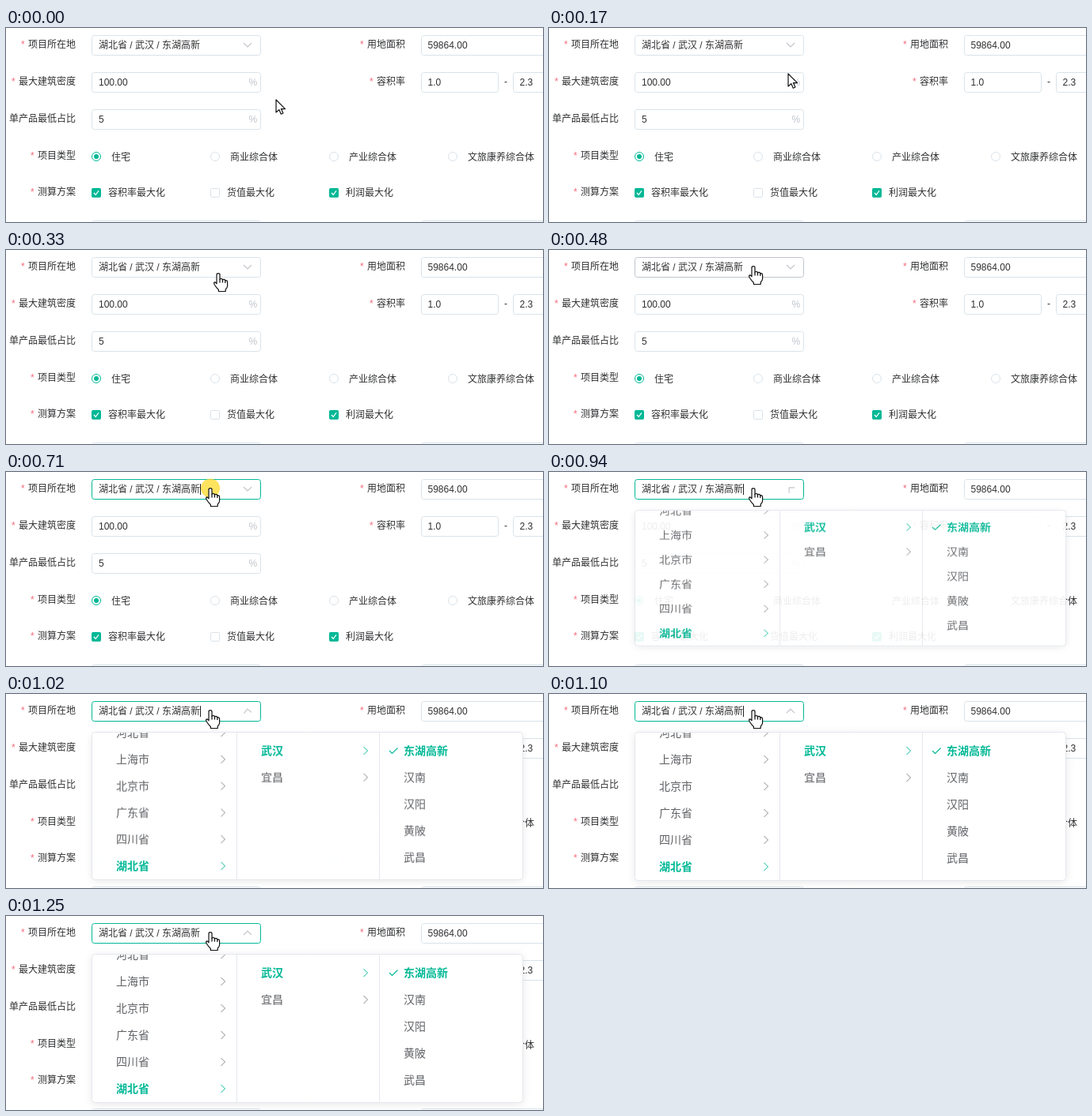
Recreate the animation shown at these times as an HTML page with a canvas. Size 678 px wide and 246 px high, loop 1.55 s.

```html
<!DOCTYPE html>
<html lang="zh-CN">
<head>
<meta charset="utf-8">
<style>
html, body { margin: 0; width: 100%; height: 100%; overflow: hidden; background: #fff; }
canvas { display: block; }
</style>
</head>
<body>
<canvas id="stage" width="678" height="246"></canvas>
<script>
const LOOP = 1550;
const STEPS = [0, 70, 140, 200, 270, 330, 400, 480, 710, 790, 870, 940, 1020, 1100, 1170, 1250];
const FONT = '"Liberation Sans", "Noto Sans CJK SC", "Noto Sans CJK", sans-serif';
const GREEN = '#00b896', LINE = '#d9e3ea', INK = '#303133', GREY = '#606266', PALE = '#c0c4cc', STAR = '#f56c7c';
const PANEL_TOP = 48;

const stage = document.getElementById('stage');
const screen = stage.getContext('2d');

function text(c, str, x, y, color = INK, size = 12, weight = 400) {
  c.font = `${weight} ${size}px ${FONT}`;
  c.fillStyle = color;
  c.fillText(str, x, y);
}

function box(c, x, y, w, h, r, stroke, fill) {
  c.beginPath();
  c.roundRect(x + .5, y + .5, w - 1, h - 1, r);
  if (fill) { c.fillStyle = fill; c.fill(); }
  if (stroke) { c.strokeStyle = stroke; c.lineWidth = 1; c.stroke(); }
}

function line(c, points, color, width = 1) {
  c.beginPath();
  points.forEach(([x, y]) => c.lineTo(x, y));
  c.strokeStyle = color;
  c.lineWidth = width;
  c.stroke();
}

function disc(c, x, y, r, fill, stroke) {
  c.beginPath();
  c.arc(x, y, r, 0, Math.PI * 2);
  if (fill) { c.fillStyle = fill; c.fill(); }
  if (stroke) { c.strokeStyle = stroke; c.lineWidth = 1; c.stroke(); }
}

// CSS-style cubic-bezier timing
function bezier(x1, y1, x2, y2) {
  const at = (a, b, u) => 3 * a * u * (1 - u) ** 2 + 3 * b * u * u * (1 - u) + u ** 3;
  return x => {
    if (x <= 0) return 0;
    if (x >= 1) return 1;
    let lo = 0, hi = 1;
    for (let i = 0; i < 24; i++) {
      const mid = (lo + hi) / 2;
      if (at(x1, x2, mid) < x) lo = mid; else hi = mid;
    }
    return at(y1, y2, lo);
  };
}
const ease = bezier(.25, .1, .25, 1);
const zoom = bezier(.23, 1, .32, 1);

function label(c, str, right, y, required = true) {
  const x = right - str.length * 12;
  text(c, str, x, y);
  if (required) text(c, '*', x - 9, y, STAR);
}

function drawForm(c, t) {
  label(c, '项目所在地', 88, 25);
  label(c, '最大建筑密度', 88, 72);
  label(c, '单产品最低占比', 88, 119, false);
  label(c, '项目类型', 88, 166);
  label(c, '测算方案', 88, 212);
  label(c, '用地面积', 504, 25);
  label(c, '容积率', 504, 72);

  const border = t >= 710 ? GREEN : t >= 400 ? PALE : LINE;
  box(c, 108, 9, 214, 26, 3, border);
  box(c, 108, 56, 214, 26, 3, LINE);
  box(c, 108, 103, 214, 26, 3, LINE);
  box(c, 108, 244, 214, 26, 3, LINE);
  box(c, 524, 9, 214, 26, 3, LINE);
  box(c, 524, 56, 98, 26, 3, LINE);
  box(c, 640, 56, 98, 26, 3, LINE);
  box(c, 524, 244, 214, 26, 3, LINE);

  text(c, '湖北省 / 武汉 / 东湖高新', 117, 26);
  text(c, '100.00', 117, 73);
  text(c, '5', 117, 120);
  text(c, '%', 306.5, 73, PALE);
  text(c, '%', 306.5, 120, PALE);
  text(c, '59864.00', 532.5, 26);
  text(c, '1.0', 532.5, 73);
  text(c, '-', 629, 72);
  text(c, '2.3', 648.5, 73);

  ['住宅', '商业综合体', '产业综合体', '文旅康养综合体'].forEach((name, i) => {
    const x = 114 + i * 150;
    disc(c, x, 163, 5.5, '#fff', i ? LINE : GREEN);
    if (!i) disc(c, x, 163, 3, GREEN);
    text(c, name, x + 19, 168);
  });

  ['容积率最大化', '货值最大化', '利润最大化'].forEach((name, i) => {
    const x = 108 + i * 150, on = i !== 1;
    box(c, x, 203, 12, 12, 1, on ? GREEN : LINE, on ? GREEN : '#fff');
    if (on) line(c, [[x + 3, 209], [x + 5.2, 211.5], [x + 9, 206.3]], '#fff', 1.2);
    text(c, name, x + 21, 213);
  });

  c.save();
  c.translate(305, 21.5);
  c.rotate(Math.PI * ease((t - 815) / 273));
  line(c, [[-5, -2.5], [0, 2.5], [5, -2.5]], PALE, 1.1);
  c.restore();
}

function column(c, names, x, y, active, arrowX) {
  names.forEach((name, i) => {
    const cy = y + i * 34, on = name === active;
    text(c, name, x, cy + 5, on ? GREEN : GREY, 14, on ? 700 : 400);
    if (arrowX) line(c, [[arrowX - 2.5, cy - 5], [arrowX + 2.5, cy], [arrowX - 2.5, cy + 5]], on ? GREEN : '#85888e');
  });
}

function makePanel() {
  const layer = document.createElement('canvas');
  layer.width = 678;
  layer.height = 270;
  const c = layer.getContext('2d');
  c.save();
  c.shadowColor = 'rgba(0,0,0,.1)';
  c.shadowBlur = 12;
  c.shadowOffsetY = 2;
  box(c, 108, PANEL_TOP, 545, 189, 4, null, '#fff');
  c.restore();
  box(c, 108, PANEL_TOP, 545, 189, 4, '#e4e7ed');
  c.beginPath();
  c.rect(109, PANEL_TOP + 1, 543, 187);
  c.clip();
  line(c, [[291.5, 48], [291.5, 237]], '#e4e7ed');
  line(c, [[471.5, 48], [471.5, 237]], '#e4e7ed');
  column(c, ['河北省', '上海市', '北京市', '广东省', '四川省', '湖北省'], 139, 49, '湖北省', 274);
  column(c, ['武汉', '宜昌'], 322, 72, '武汉', 454);
  column(c, ['东湖高新', '汉南', '汉阳', '黄陂', '武昌'], 502, 72, '东湖高新');
  line(c, [[484, 72], [487.5, 75.5], [494.5, 68.5]], GREEN, 1.2);
  return layer;
}
const panel = makePanel();

function drawPanel(c, t) {
  const k = zoom((t - 841) / 259);
  if (!k) return;
  c.save();
  c.globalAlpha = k;
  c.translate(0, PANEL_TOP);
  c.scale(1, k);
  c.drawImage(panel, 0, -PANEL_TOP);
  c.restore();
}

const ARROW = new Path2D('M0 0V16L3.8 12.6L6.3 18.2L8.9 17L6.4 11.6H11.5Z');
const HAND = new Path2D('M-2 13.8V2.4Q-2 .6 0 .6Q2 .6 2 2.4V8.2Q2.4 7 4 7.3Q5.5 7.6 5.5 9Q6.2 8 7.6 8.4Q8.8 8.8 8.8 10' +
  'Q9.6 9.2 10.7 9.8Q11.6 10.4 11.6 12V16.5Q11.6 18.5 9.2 21V23.5H.4V21.5Q-2 19.5-4.9 14.8Q-6 12.6-4.6 11.9Q-3.3 11.5-2 13.8Z');
const KNUCKLES = new Path2D('M2 8V12.5M5.5 9V12.5M8.8 10V13');

function drawCursor(c, t) {
  const p = 1 - (1 - Math.min(t / 480, 1)) ** 1.82;
  const x = 341 - 83 * p, y = 91 - 71 * p;
  const hand = y < 36;
  c.save();
  c.translate(Math.round(x), Math.round(y));
  c.lineJoin = 'round';
  c.lineWidth = 1.2;
  c.fillStyle = '#fff';
  c.strokeStyle = '#111';
  c.fill(hand ? HAND : ARROW);
  c.stroke(hand ? HAND : ARROW);
  if (hand) c.stroke(KNUCKLES);
  c.restore();
}

function draw(t) {
  const c = screen;
  c.fillStyle = '#fff';
  c.fillRect(0, 0, 678, 246);
  drawForm(c, t);
  drawPanel(c, t);
  if (t >= 710 && t < 1250) {
    c.fillStyle = '#222';
    c.fillRect(245, 15, 1, 14);
  }
  if (t >= 710 && t < 870) disc(c, 258, 20.5, 12, 'rgba(252,218,40,.75)');
  drawCursor(c, t);
}

function tick(now) {
  const t = now % LOOP;
  draw(STEPS.findLast(s => s <= t));
  requestAnimationFrame(tick);
}
const start = performance.now();
requestAnimationFrame(function run(now) {
  tick(Math.max(0, now - start));
  requestAnimationFrame = requestAnimationFrame;
});
</script>
</body>
</html>
```
